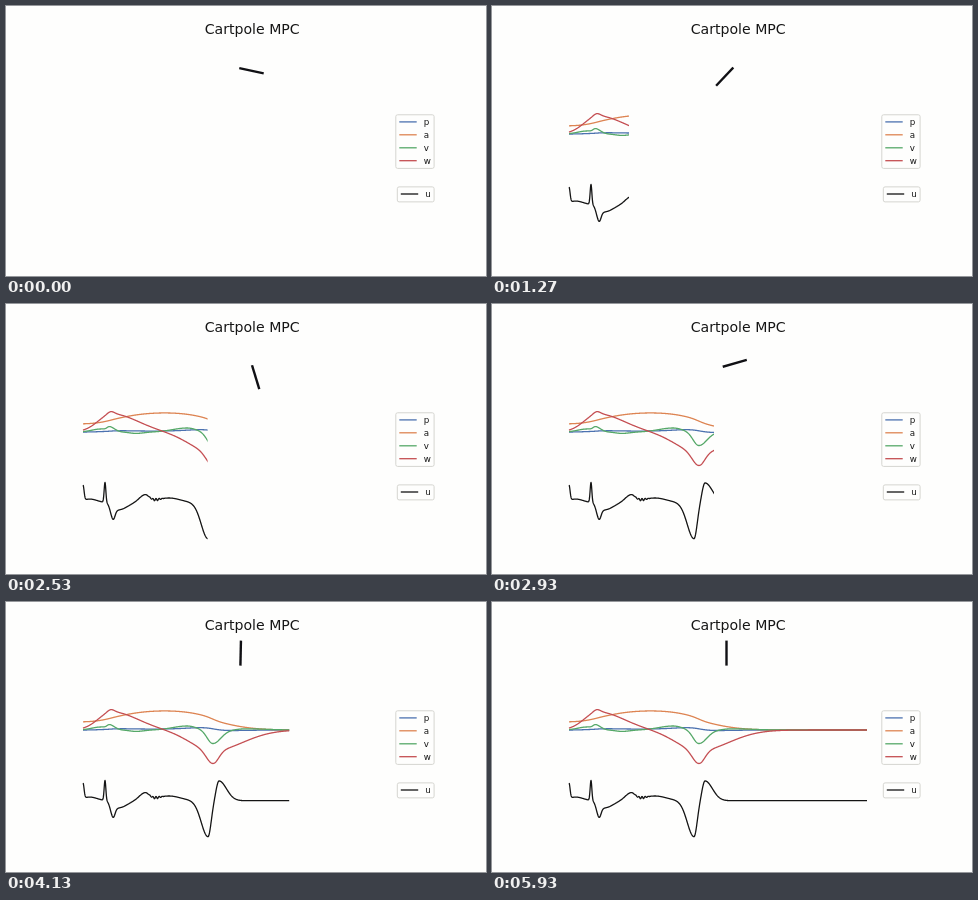
Write an HTML page that moves like this. It is 480x270 px and loops after 5990 ms.

```html
<!DOCTYPE html>
<html lang="en">
<meta charset="utf-8">
<title>Cartpole MPC</title>
<style>
  html, body { margin: 0; width: 100%; height: 100%; overflow: hidden; background: #fefefd; }
  svg { display: block; width: 480px; height: 270px; }
  text { font: 8.72px "DejaVu Sans", sans-serif; fill: #161616; }
  .title { font-size: 14.1px; text-anchor: middle; }
  .box { fill: none; stroke: #d5d5d0; stroke-width: 1; }
  .curve { fill: none; stroke-width: 1.3; stroke-linejoin: round; }
  #pole { stroke: #101014; stroke-width: 2.4; stroke-linecap: square; }
</style>
<svg viewBox="0 0 480 270">
  <clipPath id="past"><rect id="window" x="70" y="90" height="170"/></clipPath>
  <text class="title" x="246.2" y="28">Cartpole MPC</text>
  <rect class="box" x="389.8" y="108.8" width="38.3" height="53.6" rx="1.8"/>
  <rect class="box" x="391.3" y="180.9" width="36.8" height="15" rx="1.8"/>
  <g id="legend"></g>
  <g id="plot" clip-path="url(#past)"></g>
  <line id="pole"/>
</svg>
<script>
const $ = id => document.getElementById(id);
const START = 77, END = 375, STEP = 0.25;
const RATE = 0.0127;                 // simulated seconds per pixel of the time axis

// Sum of bell curves, each [height, centre, left width, right width]
const bells = (...list) => x => list.reduce((sum, [h, c, l, r]) =>
  sum + h * Math.exp(-(((x - c) / (x < c ? l : r)) ** 2)), 0);

// Position that belongs to a speed and comes to rest at zero
function integrate(speed) {
  const at = [0];
  for (let x = END; x > START; x -= STEP) at.push(at.at(-1) - speed(x - STEP / 2) * STEP * RATE);
  return x => at[Math.round((END - x) / STEP)];
}

const speed = bells([3, 95, 13, 9], [4.3, 104, 4, 7], [-1.4, 130, 9, 11],
  [4, 181, 20, 13], [-13.6, 206.8, 8, 11.3], [1.2, 240, 12, 28]);
const spin = bells([18, 106, 19.5, 36], [2.4, 105, 5, 5],
  [-20.5, 207, 32, 42], [-13, 207, 9.1, 8]);
const push = bells([15, 77, 1, 1.5], [3.6, 84, 12, 10], [20, 99, 1.2, 1.2],
  [-15, 107, 3.6, 3], [-7, 113, 5, 11], [7.3, 139, 8, 6], [4.7, 163, 18, 16],
  [-36, 202, 9.5, 4.4], [19.8, 213, 4, 10.5]);
const ripple = x => 1.2 * Math.exp(-(((x - 150) / 5) ** 2)) * Math.cos((x - 150) * 2);
const force = x => push(x) + ripple(x);
const place = integrate(speed), angle = integrate(spin);

// name, colour, function, zero line, legend position
const series = [
  ['p', '#4c72b0', place, 128, 393.3, 115.9],
  ['a', '#dd8452', angle, 128, 393.3, 128.8],
  ['v', '#55a868', speed, 128, 393.3, 141.8],
  ['w', '#c44e52', spin, 128, 393.3, 154.7],
  ['u', '#141414', force, 198.7, 394.8, 188]
];
for (const [name, color, f, zero, lx, ly] of series) {
  let points = '';
  for (let x = START; x <= END; x += STEP) points += `${x},${(zero - f(x)).toFixed(2)} `;
  $('plot').innerHTML += `<polyline class="curve" stroke="${color}" points="${points}"/>`;
  $('legend').innerHTML += `<path class="curve" stroke="${color}" d="M${lx} ${ly}h17.4"/>
    <text x="${lx + 24.4}" y="${ly + 3.1}">${name}</text>`;
}

function draw() {
  const ticks = Math.floor(performance.now() % 5990 / 10) + 0.5;
  const step = Math.floor(ticks * 0.15);          // 15 steps per second
  const head = 72.4 + 3.4 * step;
  const x = Math.min(END, Math.max(START, head));
  const px = 234.5 + 6 * place(x), py = 62.4, length = 22.6;
  const theta = angle(x) / 4.6;
  const ends = { x1: px, y1: py,
    x2: px + length * Math.sin(theta), y2: py - length * Math.cos(theta) };
  for (const key in ends) $('pole').setAttribute(key, ends[key]);
  $('window').setAttribute('width', head - 70);
  requestAnimationFrame(draw);
}
draw();
</script>
</html>
```
